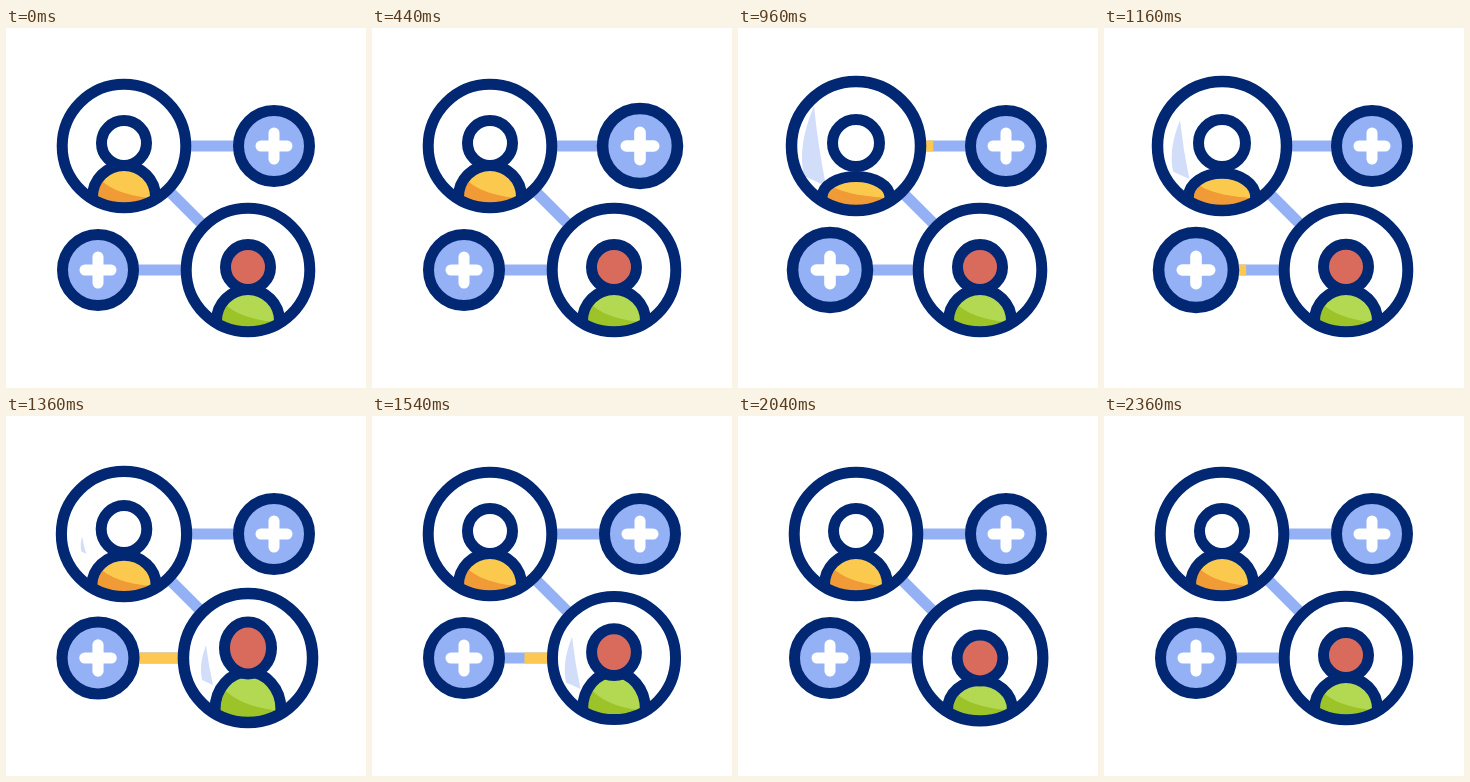
An HTML page for the animation above (2.8 s loop, 360 px wide and 360 px high).

```html
<!DOCTYPE html>
<html lang="en">
<head>
<meta charset="utf-8">
<title>Connected people</title>
<style>
  html, body { margin: 0; width: 100%; height: 100%; overflow: hidden; background: #fff; }
  svg { display: block; width: 100vw; height: 100vh; }
</style>
</head>
<body>
<svg id="stage" viewBox="0 0 360 360"></svg>
<script>
const NAVY = '#022873', BLUE = '#94b1f5', YELLOW = '#fcc852', SHINE = '#d2ddfa';
const LOOP = 2800, STEP = 20, WEIGHT = 11;
const stage = document.getElementById('stage');

function set(el, attrs) {
  for (const name in attrs) el.setAttribute(name, attrs[name]);
  return el;
}

function add(parent, tag, attrs = {}) {
  const el = document.createElementNS('http://www.w3.org/2000/svg', tag);
  parent.append(el);
  return set(el, attrs);
}

const progress = (t, from, to) => Math.min(1, Math.max(0, (t - from) / (to - from)));
const ease = (t, from, to) => (1 - Math.cos(Math.PI * progress(t, from, to))) / 2;
// Rises over a..b, stays at 1, falls over c..d.
const hold = (t, a, b, c, d) => ease(t, a, b) - ease(t, c, d);
const bell = (t, mid, half) => hold(t, mid - half, mid, mid, mid + half);
const wave = (t, crest, period) => Math.cos(2 * Math.PI * (t - crest) / period);

function line(x1, y1, x2, y2, stroke) {
  return add(stage, 'line', { x1, y1, x2, y2, stroke, 'stroke-width': WEIGHT });
}

// A yellow pulse fills the link from x1 to x2, then drains the same way.
function link(x1, x2, y, start) {
  line(x1, y, x2, y, BLUE);
  const pulse = line(x1, y, x1, y, YELLOW);
  const at = u => x1 + (x2 - x1) * u;
  return t => set(pulse, {
    x1: at(progress(t, start + 280, start + 620)),
    x2: at(progress(t, start, start + 220))
  });
}

function plusNode(x, y, swell) {
  const g = add(stage, 'g');
  add(g, 'circle', { r: 35.5, fill: BLUE, stroke: NAVY, 'stroke-width': WEIGHT });
  add(g, 'path', {
    d: 'M-13 0H13M0-13V13', stroke: '#fff', 'stroke-width': WEIGHT, 'stroke-linecap': 'round'
  });
  return t => set(g, { transform: `translate(${x} ${y}) scale(${1 + .055 * swell(t)})` });
}

// A crescent along the left of the ring; k is its size from 0 to 1.
function crescent(k) {
  const mid = 14 * (1 - k), top = mid - 40 * k, bottom = mid + 40 * k;
  const left = -40 - 12 * k, right = -40 + 10 * k;
  return `M-42 ${top}Q${left - 7 * k} ${mid} ${left} ${bottom - 10 * k}` +
         `L${right} ${bottom}Q${-41 + 3 * k} ${mid} -42 ${top}Z`;
}

// motion(t) gives ring swell, head lift, body stretch and shine size.
function person(x, y, colors, motion) {
  const g = add(stage, 'g', { transform: `translate(${x} ${y})` });
  const clipId = 'ring' + x, bodyId = 'body' + x;
  const outline = { fill: 'none', stroke: NAVY, 'stroke-width': WEIGHT };
  const clip = add(add(g, 'clipPath', { id: clipId }), 'circle');
  const disc = add(g, 'circle', { fill: '#fff' });
  const inner = add(g, 'g', { 'clip-path': `url(#${clipId})` });
  const shine = add(inner, 'path', { fill: SHINE });
  const bodyClip = add(add(inner, 'clipPath', { id: bodyId }), 'path');
  const body = add(inner, 'path', { fill: colors.light });
  const shade = add(add(inner, 'g', { 'clip-path': `url(#${bodyId})` }), 'path', {
    d: 'M-40-18H-24Q-10-3 25 1V40H-40Z', fill: colors.dark
  });
  const arch = add(inner, 'path', outline);
  const head = add(g, 'ellipse', { ...outline, fill: colors.head });
  const ring = add(g, 'circle', outline);

  return t => {
    const { swell, lift, stretch, glow } = motion(t);
    const scale = 1 + swell, r = 61.8 * scale;
    const rx = 31.5 * scale + Math.max(0, -stretch) * .1, ry = 31.5 + stretch;
    const d = `M${-rx} 80V51A${rx} ${ry} 0 0 1 ${rx} 51V80`;
    [clip, disc, ring].forEach(circle => set(circle, { r }));
    set(ring, { 'stroke-width': WEIGHT * scale });
    [bodyClip, body, arch].forEach(path => set(path, { d }));
    set(shade, { transform: `translate(0 51) scale(${rx / 31.5} ${ry / 31.5})` });
    set(head, { cy: -3 - lift, rx: 22.5 * scale, ry: 22.5 * scale + Math.max(0, lift) * .35 });
    set(shine, { d: crescent(glow) });
  };
}

line(150, 150, 210, 210, BLUE);
const parts = [
  link(232, 180, 118, 440),
  link(128, 180, 242, 1100),
  plusNode(268, 118, t => hold(t, 220, 440, 680, 820)),
  plusNode(92, 242, t => hold(t, 800, 960, 1160, 1460)),
  person(118, 118, { light: '#fcc94f', dark: '#f09b35', head: '#fff' }, t => ({
    swell: .044 * hold(t, 500, 680, 1260, 1420),
    lift: 3.5 * bell(t, 700, 220) + 2 * bell(t, 1340, 200),
    stretch: 5 * bell(t, 700, 220) - 11 * hold(t, 740, 960, 960, 1500),
    glow: hold(t, 720, 900, 960, 1540)
  })),
  person(242, 242, { light: '#b3d852', dark: '#9cc328', head: '#d96b5c' }, t => ({
    swell: .045 * wave(t, 1360, 680) * hold(t, 1160, 1320, 1600, 2360),
    lift: 7 * hold(t, 1140, 1360, 1400, 1660) - 3 * hold(t, 1500, 1700, 2040, 2360),
    stretch: 5.5 * hold(t, 1140, 1360, 1500, 1860) - 3 * bell(t, 2040, 320),
    glow: bell(t, 1460, 200)
  }))
];

function draw(ms) {
  const t = Math.floor((ms % LOOP) / STEP) * STEP;
  parts.forEach(update => update(t));
}

let start;
function frame(now) {
  start ??= now;
  draw(now - start);
  requestAnimationFrame(frame);
}
draw(0);
requestAnimationFrame(frame);
</script>
</body>
</html>
```
